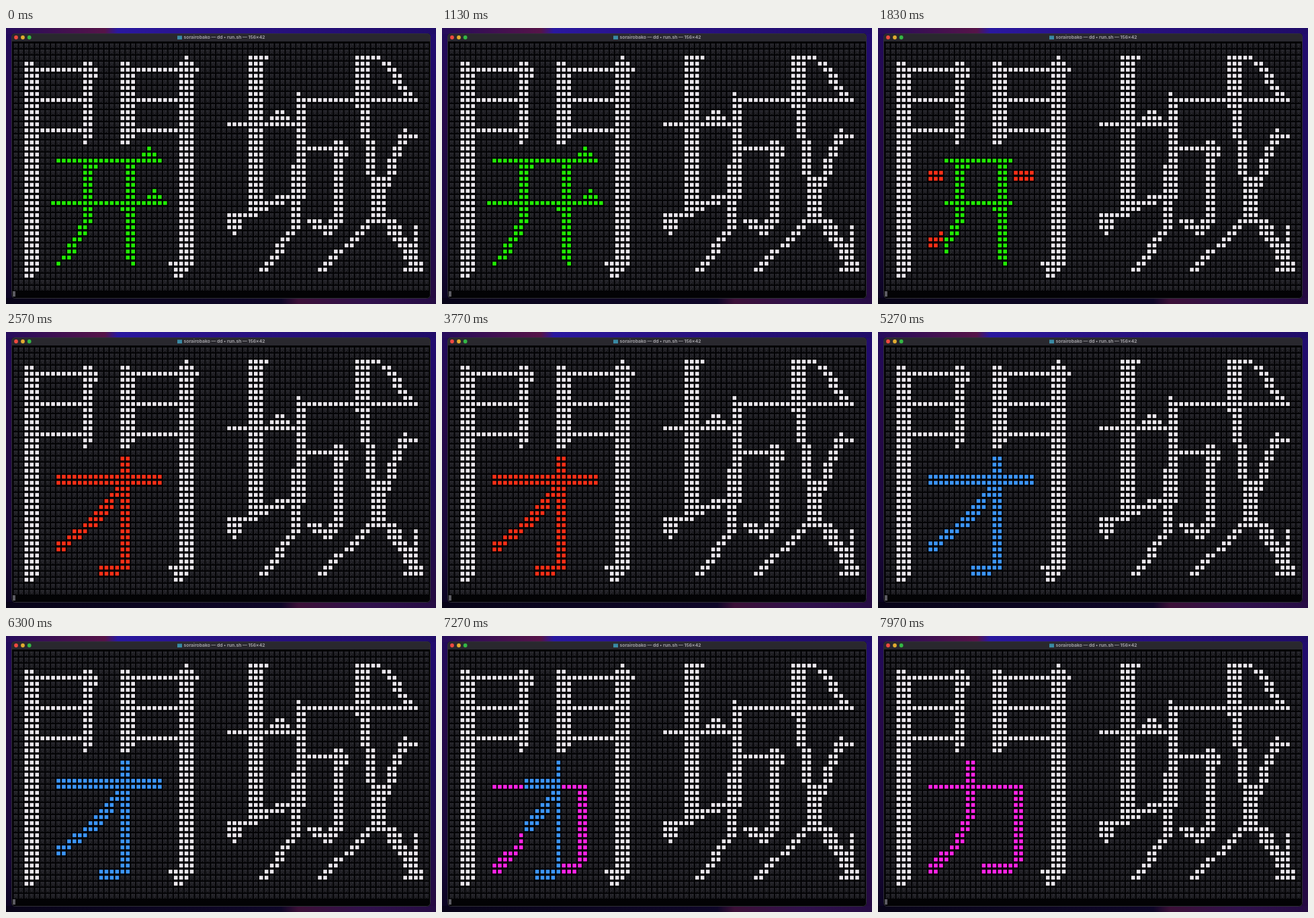
Animation, 640 px wide and 410 px high, one loop 8000 ms. Source, as an HTML page with a canvas:

```html
<!DOCTYPE html>
<html lang="en">
<head>
<meta charset="utf-8">
<title>Terminal kanji</title>
<style>
  html, body { margin: 0; width: 100%; height: 100%; overflow: hidden; background: #000; }
  canvas { display: block; width: 640px; height: 410px; }
</style>
</head>
<body>
<canvas id="stage" width="640" height="410"></canvas>
<script>
const W = 640, H = 410, LOOP = 8000;
const COLS = 78, ROWS = 41;
const LIT = '#ece8ee', DIM = '#4b4a53', SCREEN = '#030305';

const cellX = c => 14.5 + 7.94 * c;
const cellY = r => 26 + 9 * r;

// Collects the cells touched by a few brush strokes.
function glyph(paint) {
  const cells = new Set();
  const bar = (r, c0, c1) => {
    for (let c = c0; c <= c1; c++) cells.add(r * COLS + c);
  };
  // A path through [col, row] points, w cells wide in each row.
  const line = (w, ...pts) => {
    for (let i = 1; i < pts.length; i++) {
      const [c0, r0] = pts[i - 1], [c1, r1] = pts[i];
      for (let r = r0; r <= r1; r++) {
        const c = Math.round(c0 + (c1 - c0) * (r - r0) / (r1 - r0));
        bar(r, c, c + w - 1);
      }
    }
  };
  // The small triangle on the end of a horizontal stroke.
  const peak = (c, r, w = 1) => {
    bar(r, c, c + w - 1);
    bar(r + 1, c - 1, c + w);
  };
  // A post whose third column stops one row short at both ends.
  const pillar = (c, r0, r1) => {
    line(2, [c, r0], [c, r1]);
    line(1, [c + 2, r0 + 1], [c + 2, r1 - 1]);
  };
  paint({ bar, line, peak, pillar });
  return cells;
}

const fixed = glyph(({ bar, line, peak, pillar }) => {
  // gate
  pillar(2, 3, 38);
  pillar(20, 3, 16);
  line(2, [13, 3], [13, 15]);
  bar(16, 13, 13);
  bar(5, 13, 15);
  for (let r = 4; r <= 14; r += 5) {
    bar(r, 2, 14);
    bar(r, 20, 32);
  }
  bar(4, 15, 15);
  bar(4, 33, 34);
  bar(2, 32, 32);
  line(3, [31, 3], [31, 36]);
  bar(36, 29, 33);
  bar(37, 30, 32);
  bar(38, 30, 31);

  // hand
  bar(2, 44, 47);
  line(3, [44, 3], [44, 26]);
  bar(13, 40, 53);
  peak(49, 11, 2);
  line(4, [49, 25], [42, 28]);
  line(3, [40, 28], [40, 30]);
  bar(31, 41, 41);

  // long sweep and inner hook
  bar(8, 53, 53);
  bar(9, 53, 75);
  line(2, [53, 9], [53, 25], [52, 26], [52, 30], [46, 37]);
  line(1, [52, 20], [52, 25]);
  bar(17, 55, 62);
  bar(18, 60, 62);
  line(2, [60, 16], [60, 28]);
  bar(29, 55, 57);
  bar(29, 59, 61);
  bar(30, 56, 60);
  bar(31, 58, 59);

  // arc and crossing legs
  bar(2, 64, 68);
  line(1, [64, 2], [64, 10]);
  line(2, [65, 3], [65, 12], [66, 20], [67, 23]);
  line(2, [69, 3], [73, 8]);
  peak(73, 14);
  bar(15, 73, 75);
  line(2, [72, 15], [68, 25]);
  line(3, [67, 22], [67, 29]);
  line(2, [66, 29], [57, 37]);
  line(3, [69, 29], [74, 36]);
  line(1, [75, 30], [75, 37]);
  bar(37, 73, 76);
});

const lattice = glyph(({ bar, line, peak }) => {
  bar(19, 8, 27);
  peak(25, 17);
  bar(26, 7, 28);
  peak(26, 24);
  bar(20, 13, 15);
  line(2, [13, 20], [13, 28], [11, 32], [9, 35]);
  bar(36, 8, 8);
  line(2, [21, 20], [21, 35]);
  bar(27, 20, 20);
  bar(36, 22, 22);
});

const talent = glyph(({ bar, line }) => {
  bar(21, 8, 27);
  bar(22, 8, 27);
  line(2, [20, 18], [20, 36]);
  line(2, [19, 23], [17, 25]);
  line(3, [16, 26], [13, 29], [8, 32]);
  bar(33, 8, 9);
  bar(36, 16, 19);
  bar(37, 16, 19);
});

const power = glyph(({ bar, line }) => {
  bar(22, 8, 25);
  line(2, [24, 22], [24, 34]);
  line(2, [15, 18], [15, 26], [12, 32]);
  line(3, [10, 33], [8, 35]);
  bar(36, 8, 9);
  bar(35, 18, 24);
  bar(36, 18, 23);
});

const stages = [
  { cells: lattice, color: '#22ec05' },
  { cells: talent, color: '#fb3018' },
  { cells: talent, color: '#3d96fa' },
  { cells: power, color: '#ff25e8' }
];

function block(g, id, color) {
  const x = cellX(id % COLS), y = cellY(Math.floor(id / COLS));
  g.fillStyle = SCREEN;
  g.fillRect(x - 3.9, y - 4, 7.8, 9);
  g.fillStyle = color;
  g.fillRect(x - 2.8, y - 2.8, 5.6, 5.6);
}

function dot(g, x, color) {
  g.fillStyle = color;
  g.beginPath();
  g.arc(x, 14, 2.9, 0, Math.PI * 2);
  g.fill();
}

function strip(g, x, y, w, h, ...stops) {
  const grad = w > h ? g.createLinearGradient(0, 0, W, 0) : g.createLinearGradient(0, 0, 0, H);
  stops.forEach(([at, color]) => grad.addColorStop(at, color));
  g.fillStyle = grad;
  g.fillRect(x, y, w, h);
}

function drawDesktop(g) {
  strip(g, 0, 0, 10, H, [0, '#220b5c'], [0.3, '#260a4a'], [0.8, '#190838'], [1, '#0a0420']);
  strip(g, 630, 0, 10, H, [0, '#220c70'], [0.5, '#1d0a58'], [1, '#260a40']);
  strip(g, 0, 0, W, 9, [0, '#260c5c'], [0.23, '#561448'], [0.26, '#2a18a0'], [0.5, '#2a1284'], [1, '#200c68']);
  strip(g, 0, 401, W, 9, [0, '#080418'], [0.64, '#0e0628'], [0.68, '#3c1038'], [0.84, '#30104c'], [1, '#260c44']);
}

function drawWindow(g) {
  g.fillStyle = SCREEN;
  g.beginPath();
  g.roundRect(8, 8, 624, 394, 5);
  g.fill();
  g.save();
  g.clip();
  g.fillStyle = '#29282e';
  g.fillRect(8, 8, 624, 12);
  g.restore();
  g.strokeStyle = '#302f38';
  g.lineWidth = 1;
  g.beginPath();
  g.roundRect(8.5, 8.5, 623, 393, 5);
  g.stroke();

  dot(g, 15, '#f04a40');
  dot(g, 25, '#e2ac30');
  dot(g, 34.7, '#34b845');

  g.fillStyle = '#3a8aa4';
  g.fillRect(255, 11.5, 7, 5.5);
  g.fillStyle = '#a09fa4';
  g.font = 'bold 6.8px Inter, sans-serif';
  g.textAlign = 'center';
  g.textBaseline = 'middle';
  g.fillText('sorairobako — dd • run.sh — 156×42', 325, 14.3);
}

function drawGrid(g) {
  g.font = '6.5px "Noto Sans CJK JP", "Noto Sans CJK", sans-serif';
  for (let id = 0; id < COLS * ROWS; id++) {
    if (fixed.has(id)) {
      block(g, id, LIT);
    } else {
      g.fillStyle = DIM;
      g.fillText('開', cellX(id % COLS), cellY(Math.floor(id / COLS)) + 0.5);
    }
  }
  g.fillStyle = '#5c5b62';
  g.fillRect(10, 391, 4, 8);
}

const back = document.createElement('canvas');
back.width = W;
back.height = H;
const bg = back.getContext('2d');
drawDesktop(bg);
drawWindow(bg);
drawGrid(bg);

const ctx = document.getElementById('stage').getContext('2d');
const PERIOD = 2570, MID = 17;

function draw(t) {
  ctx.drawImage(back, 0, 0);
  const n = Math.floor(t / PERIOD);
  const from = stages[n], to = stages[Math.min(n + 1, stages.length - 1)];
  // The next shape closes in from both sides, one column every 100 ms.
  const radius = 6.5 - (t - n * PERIOD - 1830) / 100;
  const outside = id => Math.abs(id % COLS - MID) > radius;
  for (const id of from.cells) if (!outside(id)) block(ctx, id, from.color);
  for (const id of to.cells) if (outside(id)) block(ctx, id, to.color);
}

const begin = performance.now();
function tick() {
  draw((performance.now() - begin) % LOOP);
  requestAnimationFrame(tick);
}
tick();
</script>
</body>
</html>
```
